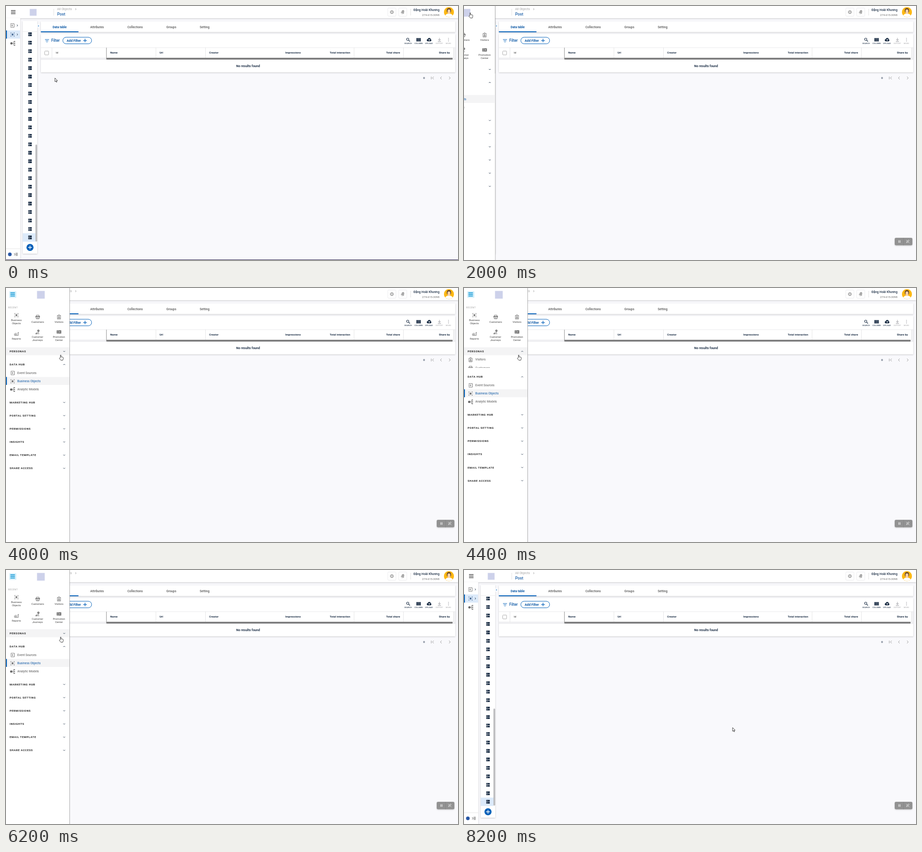
Recreate the animation shown at these times as an HTML page. Size 998 px wide and 561 px high, loop 8400 ms.

```html
<!DOCTYPE html>
<html lang="en">
<head>
<meta charset="utf-8">
<title>Data table</title>
<style>
html, body { margin: 0; width: 100%; height: 100%; overflow: hidden; background: #f9f9fc; }
svg { display: block; width: 100%; height: 100%; font-family: Roboto, sans-serif; }
.card { filter: drop-shadow(0 1px 1.5px rgba(0,0,0,.2)); }
.edge { filter: drop-shadow(.5px 0 1px rgba(0,0,0,.3)); }
</style>
</head>
<body>
<svg id="stage" viewBox="0 0 998 561"></svg>
<script>
const BLUE = '#005fb8', LINK = '#0b57a4', NAVY = '#1f3148', GREY = '#666', PALE = '#b4b4b8';

// y is the vertical middle of the text
const text = (x, y, s, size = 6.8, fill = NAVY, more = '') =>
  `<text x="${x}" y="${y + size * .355}" font-size="${size}" fill="${fill}" ${more}>${s}</text>`;
const rect = (x, y, w, h, fill, more = '') =>
  `<rect x="${x}" y="${y}" width="${w}" height="${h}" fill="${fill}" ${more}/>`;
const line = (d, stroke = GREY, w = 1, more = '') =>
  `<path d="${d}" fill="none" stroke="${stroke}" stroke-width="${w}" ${more}/>`;
const fill = (d, c) => `<path d="${d}" fill="${c}"/>`;
const disc = (x, y, r, c) => `<circle cx="${x}" cy="${y}" r="${r}" fill="${c}"/>`;
const ring = (x, y, r, c, w) => `<circle cx="${x}" cy="${y}" r="${r}" fill="none" stroke="${c}" stroke-width="${w}"/>`;
const at = (x, y, body, turn = 0) => `<g transform="translate(${x} ${y}) rotate(${turn})">${body}</g>`;
const group = (id, body) => `<g id="${id}">${body}</g>`;
const BOLD = 'font-weight="700"', MED = 'font-weight="500"';
const END = 'text-anchor="end"', MID = 'text-anchor="middle"';
const chevron = (x, y, c = NAVY, turn = 0) => at(x, y, line('M-2 -1L0 1L2 -1', c, .9), turn);
const burger = (x, y, c, w) => line([-3.5, 0, 3.5].map(d => `M${x - 5} ${y + d}h10`).join(''), c, w);

const icons = {
  event: c => line('M-3.5 -2V-4H4V4H-3.5V2M-5 0H1M-1 -2L1 0L-1 2', c, .9),
  object: c => disc(0, 0, 1.9, c) + line('M-4 -2.5V-4H-2.5M2.5 -4H4V-2.5M4 2.5V4H2.5M-2.5 4H-4V2.5', c, .8) +
    line('M-4.5 0H-3M3 0H4.5M0 -4V-3M0 3V4M-2.6 -2.6L-2 -2M2.6 -2.6L2 -2M-2.6 2.6L-2 2M2.6 2.6L2 2', c, .8),
  model: c => disc(-3, 0, 2.5, c) + line('M-1 0H3M1.5 -4V4M1.5 -4H4M1.5 4H4', c, .7) +
    [-4, 0, 4].map(y => rect(3, y - 1.1, 2.2, 2.2, c)).join(''),
  visitor: c => line('M-3.5 -3.5H3.5V4.5H-3.5ZM-1 -5H1', c, .9) + disc(0, -.8, 1.2, c) + rect(-2, 1.3, 4, 1.6, c),
  basket: c => line('M-3 -1.5V-4H3V-1.5', c, .9) + rect(-5, -1.8, 10, 1.8, c) + line('M-4 0L-3 4H3L4 0M-2 2H2', c, 1),
  journey: c => disc(2, -2.5, 2.4, c) + disc(2, -2.5, .8, '#fff') + line('M2 0V2H-3V4H4', c, .9) + disc(-3, 4, 1.2, c),
  report: c => line('M-4.5 4V1L-1 -1L1 1L4.5 -3V4Z', c, .8) + rect(-2.5, 1, 1.4, 3, c) + rect(.5, 2, 1.4, 2, c),
  ticket: c => rect(-5, -3.5, 10, 7, c) + line('M-2.5 -3V3M-.5 -2L3.5 2M3.5 -2L-.5 2', '#fff', .8),
  pie: c => fill('M-.5 .5V-3.8A4.2 4.2 0 1 0 3.8 .5ZM.8 -.8V-4.5A4 4 0 0 1 4.5 -.8Z', c)
};
const icon = (name, x, y, c = GREY) => at(x, y, icons[name](c));
const logo = (x, y, s) => rect(x - s / 2, y - s / 2, s, s, '#cdd1ea');

function header() {
  const avatar = disc(978, 13.5, 11, '#fdb813') + rect(973.3, 4.5, 9.4, 11, '#6b4a2b', 'rx="4.5"') +
    fill('M970 21.5Q970.5 17.5 976 17H980Q985.5 17.5 986 21.5Q978.5 27 970 21.5Z', '#fff') +
    rect(975, 7.5, 6, 10, '#f5cfa8', 'rx="3"');
  const box = x => rect(x, 4.5, 18, 18, '#fff', 'rx="2" stroke="#e6e6ea" stroke-width=".8"');
  const dots = x => line(`M${x} 7V21`, '#aaa', 1, 'stroke-dasharray="1 2"');
  const gear = line('M852 9V18M847.5 13.5H856.5M849 10.5L855 16.5M855 10.5L849 16.5', '#aaa', 1.3) +
    disc(852, 13.5, 3.5, '#aaa') + disc(852, 13.5, 1.5, '#fff');
  const bell = fill('M-4 3L-3 1V-1.5Q-2.5 -4.5 0 -5Q2.5 -4.5 3 -1.5V1L4 3ZM-1 4H1V5H-1Z', '#aaa');
  return rect(0, 0, 998, 27, '#fff', 'class="card"') + burger(16, 13.5, '#444', 1.3) + logo(60, 14, 15) +
    dots(105.5) + text(113, 7, 'All Objects', 6.8, '#a5a5a5') + chevron(154, 7, '#999', -90) +
    text(113, 18, 'Post', 8.7, '#1a5fa8', MED) + box(843) + box(867) + gear + at(876, 13.5, bell, 20) +
    dots(893.5) + text(957, 8.5, 'Đặng Hoài Khương', 6.8, NAVY, `${MED} ${END}`) +
    text(957, 20, '274-615-3098', 6.2, '#666', END) + avatar;
}

function tools() {
  const labels = [['SEARCH', 888], ['COLUMN', 911], ['UPLOAD', 934], ['EXPORT', 957], ['MORE', 977]];
  return labels.map(([s, x], i) =>
      text(x, 83, s, 3.9, i > 2 ? PALE : NAVY, `${MID} ${MED} letter-spacing=".35"`)).join('') +
    line('M889 75.5L892 78.5', NAVY, 1.2) + ring(887, 73.5, 2.5, NAVY, 1.1) +
    [0, 3.3, 6.6].map(d => rect(906.2 + d, 70.8, 2.9, 7.5, NAVY)).join('') +
    disc(931.7, 75.5, 2.6, NAVY) + disc(934.5, 73.8, 3.2, NAVY) + disc(937, 75.8, 2.3, NAVY) +
    rect(931.7, 75, 5.5, 3.1, NAVY) + line('M934.5 77V73.5M932.8 75L934.5 73.3L936.2 75', '#fff', .9) +
    line('M957 70.5V76M954.5 73.7L957 76.2L959.5 73.7M953.5 78.5H960.5', PALE, 1.3) +
    [71.5, 74.5, 77.5].map(y => disc(977, y, .9, PALE)).join('');
}

function table() {
  const tabs = [['Attributes', 201], ['Collections', 285], ['Groups', 365], ['Setting', 438.5]];
  const heads = [['Name', 230], ['Url', 339], ['Creator', 448.5], ['Impressions', 651, END],
    ['Total interaction', 760, END], ['Total share', 870, END], ['Share by', 980, END]];
  return rect(77, 34, 915, 23.5, '#fff', 'class="card"') + rect(77, 56, 83, 2, BLUE) +
    text(118.5, 46.5, 'Data table', 6.8, LINK, `${MID} ${BOLD}`) +
    tabs.map(([s, x]) => text(x, 46.5, s, 6.8, '#555', `${MID} ${MED}`)).join('') +
    rect(77, 62, 915, 84.5, '#fff', 'class="card"') +
    line('M86 74H95M87.5 77H93.5M89.5 80H91.5', BLUE, 1.2) +
    text(100, 76.5, 'Filter', 8.2, LINK, MED) +
    rect(125.5, 69, 63.5, 14.5, '#fff', `rx="7.2" stroke="${BLUE}"`) +
    text(134, 76.3, 'Add Filter', 7.2, LINK, BOLD) + line('M170.5 76.3H178.5M174.5 72.3V80.3', BLUE, 1.3) +
    tools() + rect(77, 114, 915, 5, '#f0f0f2') + rect(988, 92, 4, 23, '#f3f3f5') +
    line('M77 92H992', '#e3e3e6', .8) +
    line([101.5, 331, 440.5, 768.5, 877.5, 988].map(x => `M${x} 92V115`).join(''), '#dddde0', .8) +
    line('M221.7 92V118', '#aaa', 1.4) + rect(222, 114.5, 764, 3.8, '#787878', 'rx="1"') +
    rect(85.5, 99.5, 8.5, 8.5, '#fff', 'rx="1" stroke="#aaa"') + text(110, 103.2, 'Id', 6.2, '#555', MED) +
    heads.map(([s, x, side = '']) => text(x, 103.2, s, 6.2, NAVY, `${BOLD} ${side}`)).join('') +
    text(534.5, 133, 'No results found', 7, NAVY, `${MID} ${BOLD}`) + text(923, 159, '0', 6.2, NAVY, `${MID} ${MED}`) +
    line('M939 156V162M944.5 156L941.5 159L944.5 162M962 156L959 159L962 162M978 156L981 159L978 162', '#999');
}

function rails() {
  let rows = rect(37, 502, 28, 18.5, '#dceafa');
  for (let i = 0; i < 25; i++) {
    const y = 62.3 + i * 18.7;
    rows += [-4, .5].map(d => rect(49, y + d, 8, 3.6, NAVY, 'rx=".6"') + disc(51, y + d + 1.8, .7, '#fff')).join('');
  }
  return rect(0, 27, 31.5, 534, '#fff', 'class="card"') + rect(0, 54, 31, 18, '#dceafa') + rect(0, 54, 2, 18, BLUE) +
    icon('event', 14, 43) + icon('object', 14.5, 63, '#3a5f8c') + icon('model', 15, 82.5) +
    chevron(25, 43, NAVY, -90) + chevron(25, 63, NAVY, -90) + line('M0 536H31.5', '#ddd', .8) +
    disc(8.5, 548.5, 4, '#2757a5') + line('M18 546L20 548.5L18 551M21 546H26M21 548.5H26M21 551H26', '#555') +
    rect(37, 33, 32, 514, '#fff', 'class="card"') + line('M37 56.5H69', '#e8e8ea', .8) +
    group('rows', rows + disc(53, 533.3, 7.8, BLUE) + line('M48.8 533.3H57.2M53 529.1V537.5', '#fff', 1.4)) +
    rect(65, 306, 3.8, 214.5, '#bdbdbf', 'rx="1.9"') + disc(71, 44, 4, '#fff') + chevron(71.5, 44, BLUE, -90);
}

function drawer() {
  const recent = [['object', 23, 60, 'Business', 'Objects'], ['basket', 70, 64, 'Customers'], ['visitor', 117, 64, 'Visitors'],
    ['report', 23, 100.5, 'Reports'], ['journey', 69.5, 97, 'Customer', 'Journeys'], ['ticket', 117, 97, 'Promotion', 'Center']];
  const title = (s, y) => text(8, y, s, 6.1, '#222', `${BOLD} letter-spacing=".62"`);
  const section = (s, y, turn = 0) => title(s, y) + chevron(128.5, y, NAVY, turn);
  const item = (name, y, s, c = '#555') => icon(name, 14.5, y + .5) + text(25, y, s, 6.7, c);
  const closed = ['MARKETING HUB', 'PORTAL SETTING', 'PERMISSIONS', 'INSIGHTS', 'EMAIL TEMPLATE', 'SHARE ACCESS'];
  return rect(0, -5, 140, 571, '#fff', 'class="edge"') + rect(140, 0, .9, 561, '#a6a6a6') +
    rect(7, 7, 16, 15, '#d8f1fb', 'rx="2"') + burger(14.7, 14.2, '#0a94d4', 1.7) +
    logo(77, 15, 17) + text(5, 43, 'RECENT', 4.6, '#999', 'letter-spacing=".7"') +
    recent.map(([n, x, y, a, b]) => icon(n, x, y) + text(x, y + 11, a, 5.8, '#444', MID) +
      (b ? text(x, y + 18, b, 5.8, '#444', MID) : '')).join('') +
    rect(0, 131, 140, 17.5, '#f4f4f5', 'id="hoverTop"') + title('PERSONAS', 140) + group('arrow', chevron(128.5, 140)) +
    item('visitor', 158, 'Visitors') + item('basket', 176.3, 'Customers') + item('pie', 194.8, 'Segments') +
    group('rest', rect(0, 149, 140, 420, '#fff') + section('DATA HUB', 169, 180) +
      rect(0, 178.5, 140, 18, '#f6f6f7', 'id="hoverItem"') + rect(0, 196.5, 140, 17.5, '#f4f4f5') + rect(0, 196.5, 2, 17.5, BLUE) +
      group('eventItem', item('event', 187.3, 'Event Sources', 'inherit')) + item('object', 205.5, 'Business Objects', LINK) +
      item('model', 223.7, 'Analytic Models') + closed.map((s, i) => section(s, 252.7 + i * 29.1)).join(''));
}

const overlays = group('widget', rect(951, 512, 39, 16.5, '#929292', 'rx="3" class="card"') +
    line('M960 517.5V523M962.8 517.5V523', '#fff', 1.1) + line('M970.5 512V528.5', '#858585', .8) +
    line('M977 523L978 520L981.5 516.5L983 518L979.5 522ZM976.5 517L983.5 523.5', '#e8e8e8', .9)) +
  group('status', rect(0, 550, 210, 11, '#dfe1e5') +
    text(3, 555.6, 'https://cdp.antsomi.com/gen2/561236459/api-hub/event-sources/sources', 5.9, '#444', 'font-family="Open Sans, sans-serif"')) +
  rect(0, 560, 998, 1, '#2b2250', 'id="strip"') +
  `<g id="cursor" fill="#fff" stroke="#111" stroke-width=".8" stroke-linejoin="round">
    <path id="pointer" d="M0 0V8.2L1.9 6.5L3.2 9.4L4.5 8.8L3.2 6H5.8Z"/>
    <path id="hand" d="M-1 6V.8a.8 .8 0 0 1 1.6 0V4l4 .8q1 .3 .9 1.5l-.5 3.5l-.6 1.7H0L-3 7.8q-.3 -.9 .7 -1.2Z"/></g>`;

const $ = id => document.getElementById(id);
$('stage').innerHTML = rect(0, 0, 998, 561, '#f9f9fc') + header() + rails() + table() + group('drawer', drawer()) + overlays;

// linear value of a keyed track [time, ...values]
function track(t, keys) {
  const i = keys.findIndex(k => k[0] > t);
  if (i < 0) return keys[keys.length - 1].slice(1);
  const a = keys[i - 1], b = keys[i], u = (t - a[0]) / (b[0] - a[0]);
  return a.slice(1).map((v, j) => v + (b[j + 1] - v) * u);
}
const slide = [[0, -146], [1800, -146], [2000, -71.5], [2200, 0], [7600, 0], [7800, -71.5], [8000, -146]];
const unfold = [[0, 0], [4200, 0], [4600, 54.5], [5600, 54.5], [6000, 0]];
const path = [[0, 108, 159], [200, 106, 157], [1200, 14, 14], [1600, 14, 15], [2400, 14, 15], [3000, 58, 196],
  [3400, 121, 148], [6600, 121, 148], [7400, 14, 11], [7800, 14, 11], [8200, 593, 348]];

const move = (id, x, y) => $(id).setAttribute('transform', `translate(${x} ${y})`);
const show = (id, on) => { $(id).style.display = on ? '' : 'none'; };

function draw(now) {
  const t = Math.floor(now % 8400 / 200) * 200;
  const between = (a, b) => t >= a && t < b;
  const [open] = track(t, unfold);
  move('drawer', track(t, slide)[0], 0);
  move('rest', 0, open);
  move('cursor', ...track(t, path));
  move('rows', 0, t < 1400 ? 0 : .7);
  $('arrow').setAttribute('transform', between(4400, 5800) ? 'rotate(180 128.5 140)' : '');
  const onItem = between(2800, 3400), hand = between(1200, 8000);
  show('hoverItem', onItem);
  $('eventItem').setAttribute('fill', onItem ? LINK : '#555');
  show('status', between(2800, 3800));
  show('hoverTop', between(3400, 7000));
  show('widget', t >= 400);
  show('strip', t < 1400);
  show('hand', hand);
  show('pointer', !hand);
}
const start = performance.now();
(function loop() {
  draw(performance.now() - start);
  requestAnimationFrame(loop);
})();
</script>
</body>
</html>
```
